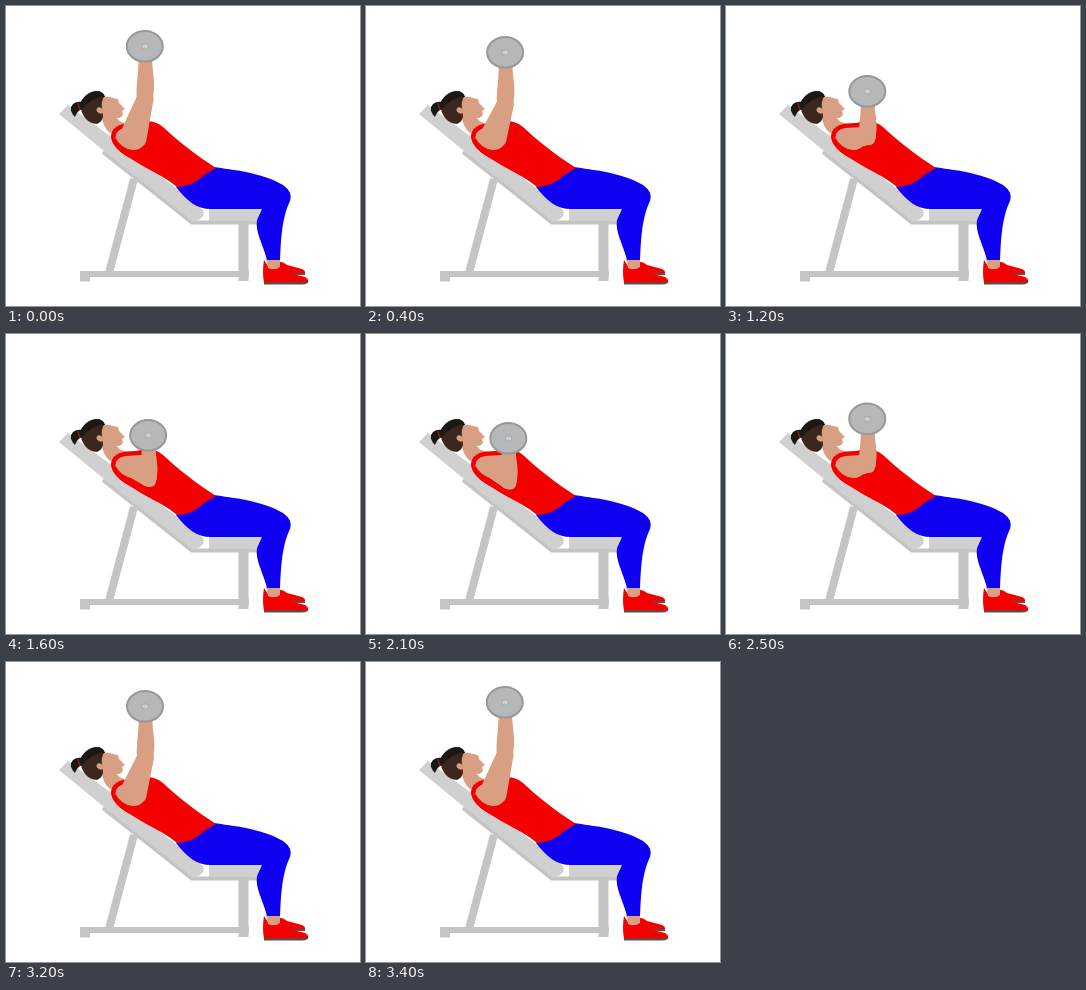
An HTML page without scripts for the animation above (3.5 s loop, 354x300 px).

```html
<!DOCTYPE html>
<html lang="en">
<head>
<meta charset="utf-8">
<title>Incline dumbbell press</title>
<style>
  /* --y: how far the weight has been lowered, in px */
  @property --y { syntax: "<number>"; inherits: true; initial-value: 0; }

  html, body { margin: 0; width: 100%; height: 100%; overflow: hidden; background: #fff; }
  svg { display: block; width: 354px; height: 300px; animation: press 3500ms infinite; }

  /* the pose advances every 100 ms */
  @keyframes press {
    0%      { --y: 0;    animation-timing-function: steps(2); }
    5.714%  { --y: 1.5;  animation-timing-function: steps(2); }
    11.428% { --y: 6;    animation-timing-function: steps(2); }
    17.142% { --y: 13;   animation-timing-function: steps(3); }
    25.714% { --y: 27;   animation-timing-function: steps(3); }
    34.285% { --y: 45;   animation-timing-function: steps(2); }
    40%     { --y: 55;   animation-timing-function: steps(2); }
    45.714% { --y: 61;   animation-timing-function: steps(3); }
    54.285% { --y: 64.5; animation-timing-function: steps(2); }
    60%     { --y: 64;   animation-timing-function: steps(2); }
    65.714% { --y: 57;   animation-timing-function: steps(1); }
    68.571% { --y: 51;   animation-timing-function: steps(5); }
    82.857% { --y: 19;   animation-timing-function: steps(1); }
    85.714% { --y: 13;   animation-timing-function: steps(2); }
    91.428% { --y: 4;    animation-timing-function: steps(2); }
    97.142%, 100% { --y: 0; }
  }

  .skin { fill: #d99f82; }
  .red { fill: #f40000; }
  .blue { fill: #1000f2; }
  .pad { fill: #d0d0d0; }
  .sole { fill: #6b4444; }
  .frame { fill: none; stroke: #c4c4c4; }

  .weight { transform: translate(calc(138.5px + var(--y) * .055px), calc(40px + var(--y) * 1px)); }
  .forearm { transform: scaleY(calc(1 - var(--y) * .0022)); }

  /* unit lines running from the shoulder to the elbow */
  .upper {
    fill: none; stroke: #d99f82; stroke-width: 17; stroke-linecap: round;
    vector-effect: non-scaling-stroke;
    --ex: calc(139 + var(--y) * .05);
    --ey: calc(93 + var(--y) * .835);
    transform: matrix(calc(var(--ex) - var(--sx)), calc(var(--ey) - var(--sy)), 0, 1, var(--sx), var(--sy));
  }
  .rear { --sx: 121; --sy: 132; }
  .front { --sx: 132; --sy: 133; }
</style>
</head>
<body>
<svg viewBox="0 0 354 300" role="img" aria-label="Woman pressing dumbbells on an incline bench">
  <g id="bench">
    <path class="frame" stroke-width="8" d="M128 173L103 267"/>
    <path class="frame" stroke-width="10" d="M237.5 214V275"/>
    <path class="frame" stroke-width="6" d="M74 268H243"/>
    <path class="frame" stroke-width="5" d="M74 273H84"/>
    <path class="frame" stroke-width="4" d="M97 146L186 216.500H252"/>
    <path class="pad" d="M53 108L62 99L108 133L197 204Q199 208 196 211Q193 215 187 215L98 145Z"/>
    <path class="pad" d="M203 203H257Q256 214 247 215H203Z"/>
  </g>

  <g id="head">
    <path class="skin" d="M95 91Q102 90 107 92L112 93L113 97L119 103L116 105L117 108Q116 112 111 112Q113 117 124 118L112 126L104 127Q97 121 96 112L90 100Z"/>
    <path fill="#1b1816" d="M76 96Q68 95 65 101Q64 106 69 111Q71 105 76 103Z"/>
    <path fill="#3b271e" d="M74 99C76 91 84 85 91 85Q98 86 98 91Q95 95 96 102L97 110Q97 115 91 118Q77 117 74 99Z"/>
    <path fill="#1b1816" d="M74 98C78 88 86 85 92 85Q98 86 99 91Q86 90 75 104Z"/>
    <ellipse class="skin" cx="94" cy="104.500" rx="3.700" ry="2.700" transform="rotate(35 94 104.500)"/>
    <path fill="none" stroke="#8f1d1d" stroke-width="1.500" d="M72 97L74 104"/>
  </g>

  <g id="legs">
    <path class="red" d="M272 256Q276 255 281 259L296 263Q300 265 299 268H272Z"/>
    <path class="sole" d="M278 267H299V269H278Z"/>
    <path class="red" d="M258 254L262 260Q268 264 274 261Q279 265 287 268L299 271Q303 273 302 277H258Q256 266 258 254Z"/>
    <path class="skin" d="M260 250H274V261Q268 265 262 262Z"/>
    <path class="sole" d="M258 276H302Q301 278.500 296 278.500H258Z"/>
    <path class="blue" d="M208 161C226 164 255 166 277 179Q287 186 284 195C276 211 275 232 274 254H261C257 238 249 226 251 214L256 203H205C190 203 181 195 170 181L188 168Z"/>
  </g>

  <path class="red" d="M105 131Q105 121 117 118L130 117Q147 112 157 121C172 135 191 150 210 162L198 169Q188 180 171 181C160 171 142 164 127 154Q106 143 105 131Z"/>

  <g id="arm">
    <path class="skin" d="M109 131Q110 122 122 121H137L141 131L138 138Q135 144 127 144Q115 143 109 131Z"/>
    <path fill="none" stroke="#f40000" stroke-width="4" d="M107 132Q107 122 119 120L135 119"/>
    <path class="upper rear" d="M0 0H1"/>
    <path class="upper front" d="M0 0H1"/>
    <g class="weight">
      <path class="skin forearm" d="M-6 12H7.500C8 28 11 36 9 48C8 57 7 60 2 60C-4 60 -8 56 -8 48C-8 36 -6 28 -6 12Z"/>
      <ellipse cx=".3" cy=".3" rx="18" ry="15.300" fill="#b6b7b8" stroke="#979899" stroke-width="2"/>
      <ellipse cx=".5" cy=".5" rx="3.500" ry="2.700" fill="#cbccce" stroke="#a5a6a7"/>
    </g>
  </g>
</svg>
</body>
</html>
```
